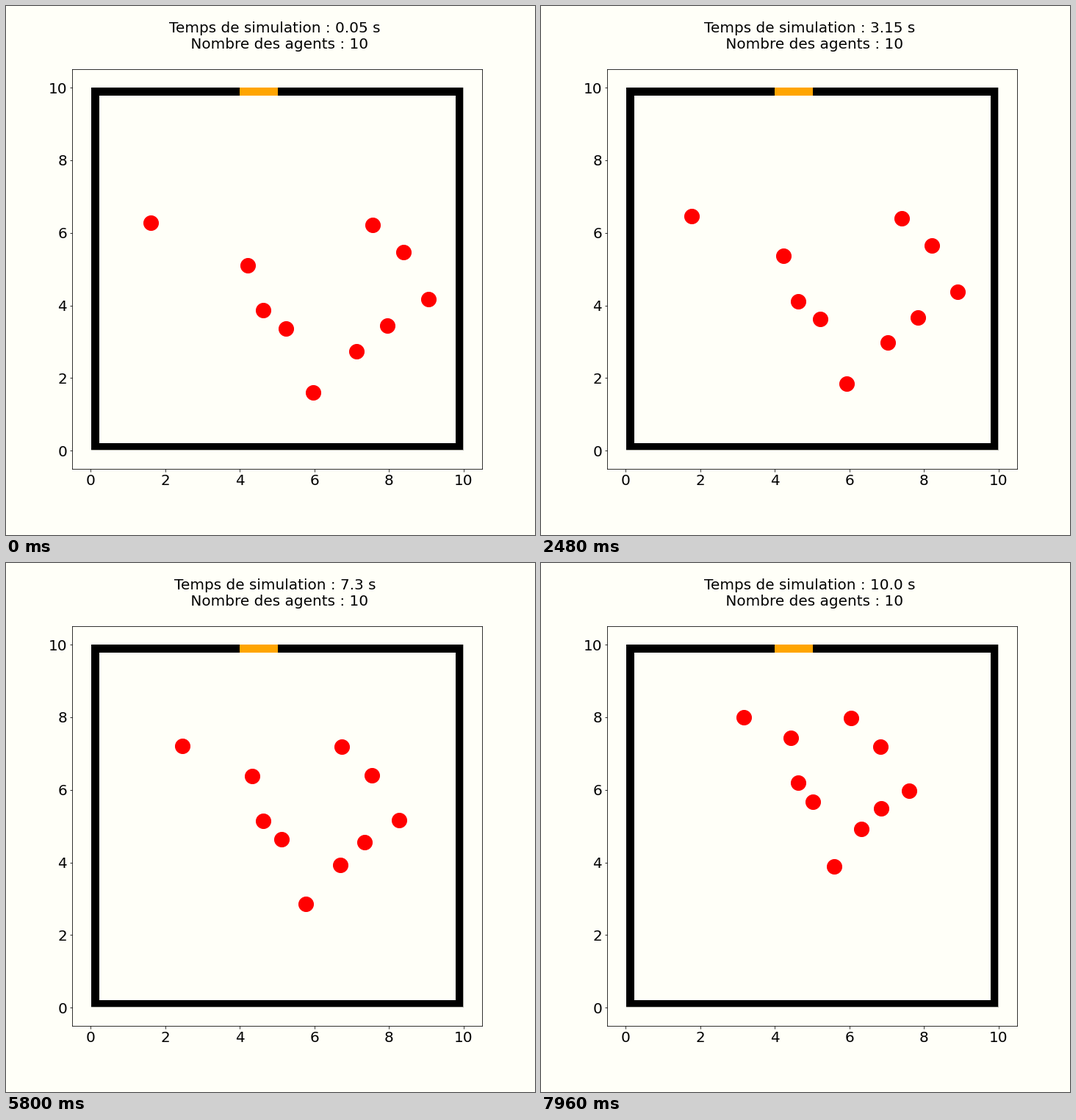
Recreate the animation shown at these times as a matplotlib script. Size 720 px wide and 720 px high, loop 8000 ms.

```python
import numpy as np
import matplotlib.pyplot as plt
from matplotlib.animation import FuncAnimation
from matplotlib.patches import Rectangle

plt.rcParams["font.family"] = "DejaVu Sans"
plt.rcParams["font.size"] = 20

SIZE = 720
FRAMES = 200
INTERVAL = 40
DT = 0.05
SPEED = 1.46              # limit speed of the agents
TAU = 28.0                # relaxation time towards it
DOOR = np.array([4.63, 9.63])
PAPER = "#fffff8"

START = np.array([
    (1.61, 6.27), (4.21, 5.11), (4.63, 3.87), (5.24, 3.37), (5.97, 1.60),
    (7.12, 2.74), (7.95, 3.44), (9.07, 4.18), (8.39, 5.46), (7.57, 6.22),
])
AIM = DOOR - START
AIM /= np.linalg.norm(AIM, axis=1, keepdims=True)


def travel(t):
    """Distance walked while the speed relaxes towards its limit."""
    return SPEED * (t - TAU * (1 - np.exp(-t / TAU)))


fig = plt.figure(figsize=(10, 10), dpi=72, facecolor=PAPER)

# room layer in pixels, y pointing down
stage = fig.add_axes([0, 0, 1, 1], zorder=1)
stage.set_xlim(0, SIZE)
stage.set_ylim(SIZE, 0)
stage.axis("off")


def block(x0, y0, x1, y1, color):
    stage.add_patch(Rectangle((x0, y0), x1 - x0, y1 - y0,
                              facecolor=color, linewidth=0))


block(116, 111, 623, 605, "#b4b4ac")    # soft outer edge
block(116, 111, 622, 604, "black")      # walls
block(127, 122, 612, 595, PAPER)        # room
block(318, 111, 370, 122, "#ffa500")    # door

# plot frame with ticks
ax = fig.add_axes([0.125, 0.125, 0.775, 0.755], zorder=2, facecolor="none")
ax.set_xlim(-0.5, 10.5)
ax.set_ylim(-0.5, 10.5)
ax.set_xticks(range(0, 11, 2))
ax.set_yticks(range(0, 11, 2))
title = ax.set_title("", fontsize=20, pad=28)
dots, = ax.plot([], [], "o", color="red", markersize=20)


def update(i):
    t = (i + 1) * DT
    dots.set_data(*(START + AIM * travel(t)).T)
    title.set_text(f"Temps de simulation : {round(t, 2)} s \n"
                   f" Nombre des agents : {len(START)}")
    return dots, title


anim = FuncAnimation(fig, update, frames=FRAMES, interval=INTERVAL,
                     repeat=True, repeat_delay=0, blit=False)
plt.show()
```
